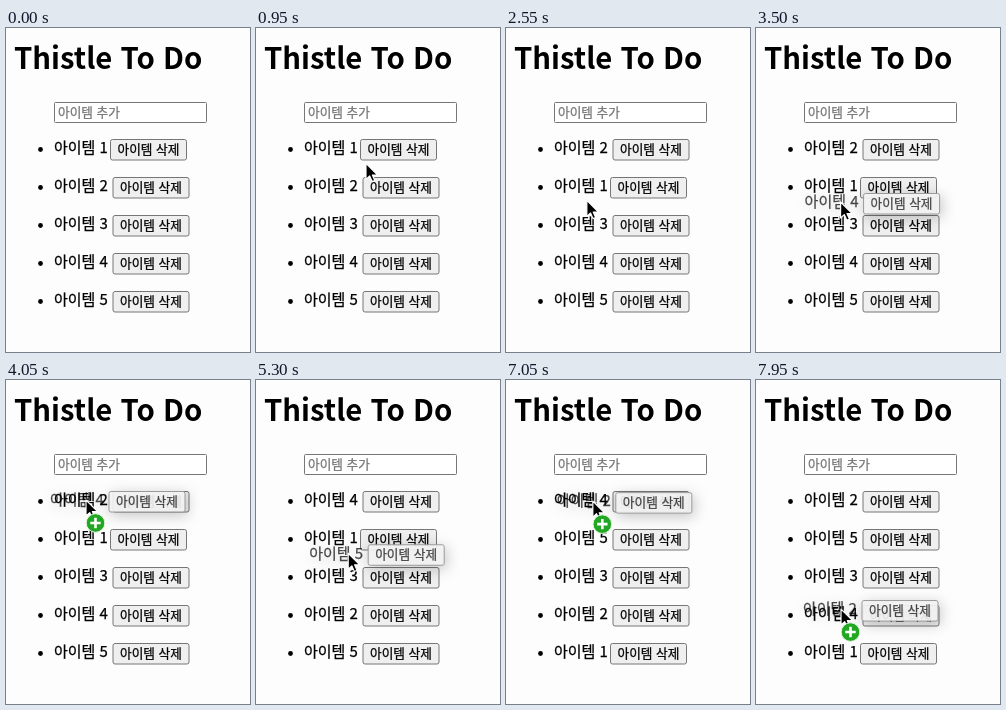
Write an HTML page that moves like this. It is 244 px wide and 324 px high and loops after 8000 ms.

```html
<!DOCTYPE html>
<html lang="ko">
<head>
<meta charset="utf-8">
<style>
  html, body { margin: 0; width: 100%; height: 100%; overflow: hidden; background: #fdfdfd; }
  svg { display: block; width: 244px; height: 324px; font-family: "Noto Sans CJK KR", "Noto Sans CJK", sans-serif; }
  text { white-space: pre; }
  .title { font-size: 29.3px; font-weight: 700; }
  .label { font-size: 15px; }
  .small { font-size: 12.7px; }
  .label, .small { stroke: #000; stroke-width: .25; }
  .hint { fill: #757575; stroke: #757575; }
  .box { stroke: #767676; fill: #efefef; }
  #ghost { filter: drop-shadow(2px 3px 7px rgba(0, 0, 0, .24)); }
  #ghost text { opacity: .72; }
  #ghost .box { fill: #f3f3f3; fill-opacity: .92; stroke: #999; }
</style>
</head>
<body>
<svg viewBox="0 0 244 324">
  <text class="title" x="8" y="40.5">Thistle To Do</text>
  <rect class="box" x="48.5" y="74.5" width="152" height="20" rx="1" style="fill: #fff"/>
  <text class="small hint" x="52" y="88.5">아이템 추가</text>
  <g id="bullets"></g>
  <g id="items"></g>
  <g id="ghost"></g>
  <g id="cursor">
    <path d="M0 0V16L3.7 12.6L6.2 18.2L8.8 17.1L6.4 11.6H11.6Z" stroke="#fff" stroke-width="1.2" stroke-linejoin="round"/>
    <g id="badge">
      <circle cx="9.5" cy="23" r="9.3" fill="#22a722" stroke="#e4f3e4"/>
      <path d="M9.5 17.8V28.2M4.3 23H14.7" stroke="#fff" stroke-width="2.6"/>
    </g>
  </g>
</svg>
<script>
const LOOP = 8000, STEP = 50, ENTER = 500, PITCH = 38, FIRST_ROW = 120, BOW = 3;
const $ = id => document.getElementById(id);

// Each move starts where the previous one ended; a move with a drop time drags
// the item under the pointer and swaps it with the one it lands on.
const moves = [
  { start: 450, end: 1300, x: 77, row: -.15 },
  { start: 1500, end: 2350, x: 78, row: .87, drop: 2350 },
  { start: 2450, end: 3100, x: 84, row: 3 },
  { start: 3200, end: 4050, x: 80, row: 0, drop: 4100 },
  { start: 4100, end: 4800, x: 87, row: 4 },
  { start: 4900, end: 5500, x: 90, row: 1, drop: 5750 },
  { start: 5750, end: 6150, x: 84, row: 3 },
  { start: 6550, end: 7100, x: 86, row: 0, drop: 7200 },
  { start: 7750, end: 7950, x: 85, row: 2.87, drop: LOOP }
];
moves.forEach((move, i) => move.from = moves[i - 1] || { x: 226, row: 2.6 });

const itemMarkup = n => {
  const x = n === 1 ? 104.5 : 107;
  return `<text class="label" x="48" y="125.3">아이템 ${n}</text>
    <rect class="box" x="${x}" y="111.5" width="76" height="20.5" rx="2"/>
    <text class="small" x="${x + 7}" y="125.7">아이템 삭제</text>`;
};

const numbers = [1, 2, 3, 4, 5];
$('bullets').innerHTML = numbers.map((_, row) => `<circle cx="34.5" cy="${121.5 + row * PITCH}" r="2.4"/>`).join('');
$('items').innerHTML = numbers.map(n => `<g>${itemMarkup(n)}</g>`).join('');
const items = [...$('items').children];

const place = (el, x, y) => el.setAttribute('transform', `translate(${x} ${y})`);
const show = (el, on) => el.style.display = on ? '' : 'none';

// The hand slows down towards its goal and swings slightly to the right.
function pointerAt(t, { start, end, from, x, row }) {
  const u = Math.min(1, Math.max(0, (t - start) / (end - start)));
  const eased = Math.sin(u * Math.PI / 2);
  return {
    x: from.x + (x - from.x) * eased + BOW * Math.sin(u * Math.PI),
    row: from.row + (row - from.row) * eased
  };
}

let ghostNumber = 0;

function render(now) {
  const t = Math.floor(now % LOOP / STEP) * STEP;
  const order = [...numbers];
  for (const { drop, from, row } of moves) {
    if (!drop || t < drop) continue;
    const a = Math.abs(Math.round(from.row)), b = Math.round(row);
    [order[a], order[b]] = [order[b], order[a]];
  }
  order.forEach((n, row) => place(items[n - 1], 0, row * PITCH));

  const move = moves.findLast(m => t >= m.start) || moves[0];
  const tip = pointerAt(t, move);
  place($('cursor'), tip.x, FIRST_ROW + tip.row * PITCH);
  show($('cursor'), t >= ENTER);

  const dragging = t > move.start && t < move.drop;
  const overItem = Math.abs(tip.row - Math.round(tip.row)) < .29;
  show($('ghost'), dragging);
  show($('badge'), dragging && overItem);
  if (dragging) {
    const { from } = move, home = Math.abs(Math.round(from.row));
    if (order[home] !== ghostNumber) $('ghost').innerHTML = itemMarkup(ghostNumber = order[home]);
    place($('ghost'), tip.x - from.x, (home + tip.row - from.row) * PITCH);
  }
}

function tick() {
  render(performance.now());
  requestAnimationFrame(tick);
}
tick();
</script>
</body>
</html>
```
